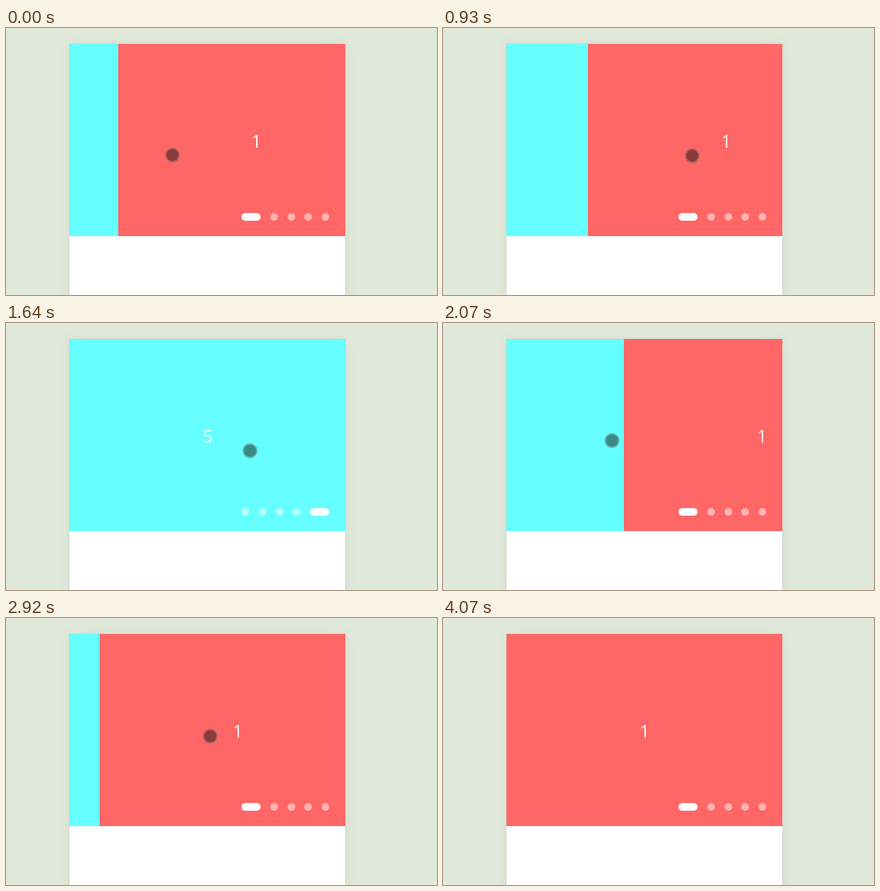
Animation of 672 by 417 pixels, one loop 4370 ms. Source, as an HTML page with a canvas:

```html
<!DOCTYPE html>
<html lang="en">
<head>
<meta charset="utf-8">
<title>Draggable carousel</title>
<style>
  html, body { margin: 0; width: 100%; height: 100%; overflow: hidden; background: #e1e9db; }
  canvas { display: block; }
</style>
</head>
<body>
<canvas id="stage" width="672" height="417"></canvas>
<script>
const ctx = document.getElementById('stage').getContext('2d');
const LOOP = 4370;
const CARD = { x: 99, y: 25, w: 430, h: 300 };
const SETTLE = .04; // share of the distance left one tick after release

// Pointer path: tick, x, y
const path = [
  [-1, 183.5, 198.5], [0, 259.5, 198.5],
  [4.6, 261.5, 198.5], [7, 388.5, 199.5], [10, 394.5, 199.5],
  [12, 380.5, 199.5], [13.65, 380.5, 199.5], [15, 263.5, 183.5],
  [18, 271.5, 183.5], [19.6, 318.5, 184.5], [21.3, 318.5, 184.5],
  [23, 301.5, 185.5], [25, 347.5, 186], [28, 649, 395]
];

// Swipes: ticks of grab and drop, whether the last slide is shown before and after
const swipes = [
  { grab: -1, drop: .1, from: 0, to: 0 },
  { grab: 4, drop: 10, from: 0, to: 1 },
  { grab: 12, drop: 14.828, from: 1, to: 0 },
  { grab: 18, drop: 21.35, from: 0, to: 0 },
  { grab: 23, drop: 25.35, from: 0, to: 0 }
];

function pointerAt(tick) {
  const next = path.findIndex(p => p[0] > tick);
  const [t1, x1, y1] = path.at(next);
  if (next < 0) return { x: x1, y: y1 };
  const [t0, x0, y0] = path[next - 1];
  const u = (tick - t0) / (t1 - t0);
  const e = u * u * (3 - 2 * u);
  return { x: x0 + (x1 - x0) * e, y: y0 + (y1 - y0) * e };
}

function carouselAt(tick) {
  const { grab, drop, from, to } = swipes.findLast(s => s.grab <= tick);
  const drag = pointerAt(Math.min(tick, drop)).x - pointerAt(grab).x;
  let offset = from * CARD.w + drag;
  const released = tick > drop;
  if (released) {
    const rest = to * CARD.w;
    offset = rest + (offset - rest) * SETTLE ** (tick - drop);
  }
  return { offset: Math.round(offset), active: (released ? to : from) * 4 };
}

function drawCard() {
  ctx.fillStyle = '#e1e9db';
  ctx.fillRect(0, 0, 672, 417);
  ctx.save();
  ctx.shadowColor = 'rgba(0,0,0,.06)';
  ctx.shadowBlur = 20;
  ctx.fillStyle = '#fff';
  ctx.fillRect(CARD.x, CARD.y, CARD.w, 460);
  ctx.restore();
  ctx.strokeStyle = 'rgba(0,0,0,.05)';
  ctx.lineWidth = 1;
  ctx.strokeRect(CARD.x - .5, CARD.y - .5, CARD.w + 1, 460);
}

function drawSlide(x, color, label) {
  ctx.fillStyle = color;
  ctx.fillRect(x, CARD.y, CARD.w, CARD.h);
  ctx.fillStyle = '#fff';
  ctx.fillText(label, x + CARD.w / 2 + .5, 186.5);
}

function drawSlides(offset) {
  ctx.save();
  ctx.beginPath();
  ctx.rect(CARD.x, CARD.y, CARD.w, CARD.h);
  ctx.clip();
  ctx.font = '500 27px "Open Sans", "Noto Sans", sans-serif';
  ctx.textAlign = 'center';
  drawSlide(CARD.x + offset - CARD.w, '#6ff', '5');
  drawSlide(CARD.x + offset, '#f66', '1');
  ctx.restore();
}

function drawDots(active) {
  let x = 367.33;
  for (let i = 0; i < 5; i++) {
    const w = i === active ? 30 : 12;
    ctx.fillStyle = i === active ? '#fff' : 'rgba(255,255,255,.5)';
    ctx.beginPath();
    ctx.roundRect(Math.round(x), 289, w, 12, 6);
    ctx.fill();
    x += w + 14.67;
  }
}

function drawTouch(x, y) {
  ctx.strokeStyle = 'rgba(100,100,100,.5)';
  ctx.lineWidth = 2;
  ctx.beginPath();
  ctx.arc(x, y, 10.5, 0, 2 * Math.PI);
  ctx.stroke();
  ctx.fillStyle = 'rgba(10,10,10,.48)';
  ctx.beginPath();
  ctx.arc(x, y, 9.5, 0, 2 * Math.PI);
  ctx.fill();
}

function drawArrow(x, y) {
  ctx.save();
  ctx.translate(x + .5, y + .5);
  ctx.fillStyle = '#fff';
  ctx.strokeStyle = '#000';
  ctx.lineWidth = 1;
  const shape = new Path2D('M0 0V16L4 12.5L6.5 18L9 17L6.5 11.5H11Z');
  ctx.fill(shape);
  ctx.stroke(shape);
  ctx.restore();
}

function draw(time) {
  // The picture moves in hard steps, seven per second
  const tick = Math.floor(time * .007 + .625);
  const { offset, active } = carouselAt(tick);
  const { x, y } = pointerAt(tick);
  drawCard();
  drawSlides(offset);
  drawDots(active);
  if (tick < 29) (x > CARD.x + CARD.w ? drawArrow : drawTouch)(x, y);
}

const start = performance.now();
function loop() {
  draw((performance.now() - start) % LOOP);
  requestAnimationFrame(loop);
}
loop();
</script>
</body>
</html>
```
